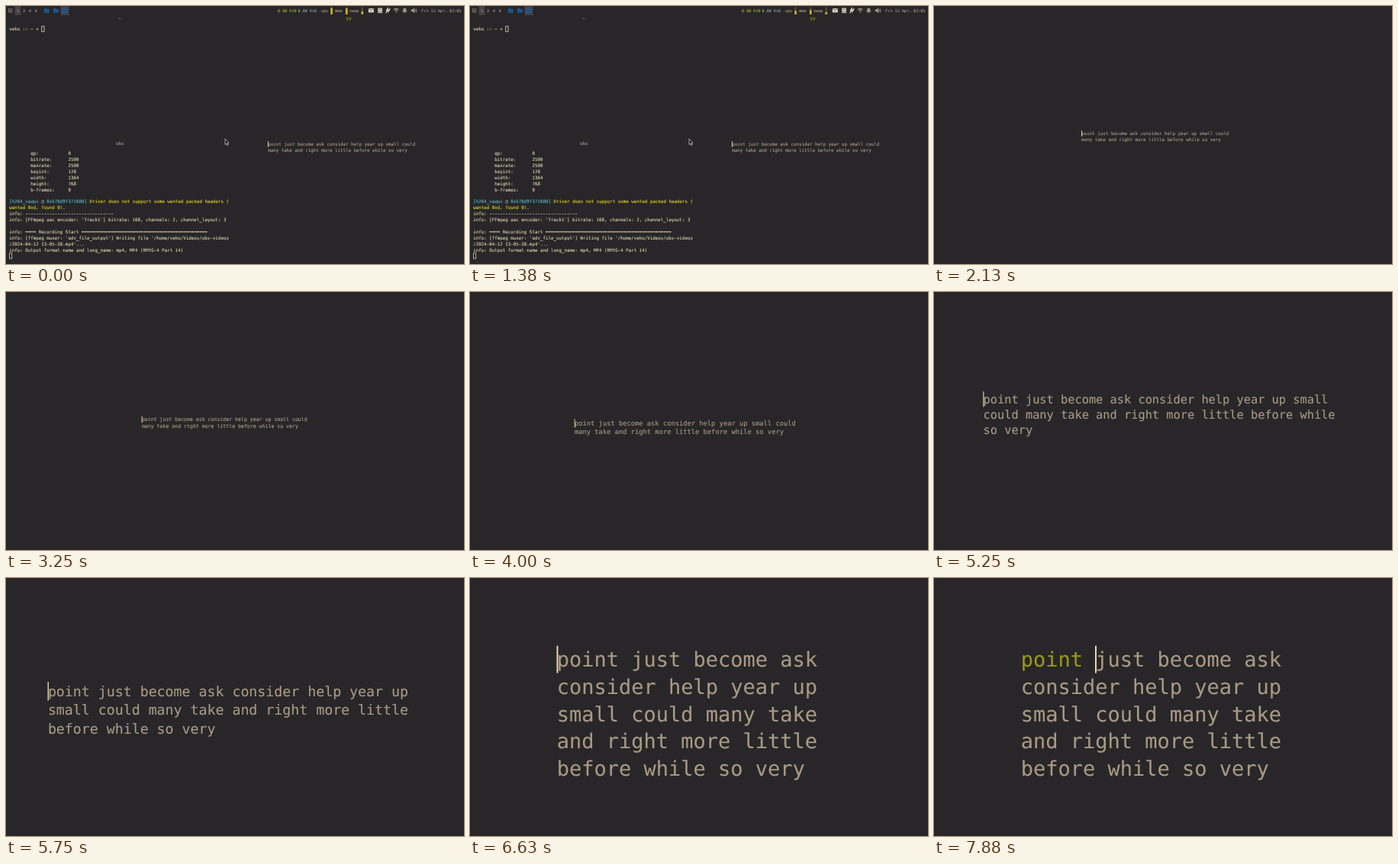
Write an HTML page that moves like this. It is 600 px wide and 338 px high and loops after 8 s.

```html
<!DOCTYPE html>
<html lang="en">
<head>
<meta charset="utf-8">
<title>Typing test</title>
<style>
  html, body { margin: 0; width: 100%; height: 100%; overflow: hidden; background: #282628; }
  svg { display: block; width: 600px; height: 338px; }
  text { font-family: "DejaVu Sans Mono", monospace; white-space: pre; text-rendering: geometricPrecision; }
</style>
</head>
<body>
<svg id="stage" viewBox="0 0 600 338">
  <g id="desk">
    <g id="bar"></g>
    <g id="panes"></g>
  </g>
  <g id="typer"></g>
  <path id="pointer" d="M287 173.8V181.6L288.8 180.1L290 182.7L291.1 182.1L290 179.7L292 179.3Z"
        fill="#1c1a1c" stroke="#d8d4cc" stroke-width=".7"/>
</svg>
<script>
const LOOP = 8000, SCREEN = 1366, K = 600 / SCREEN;
const EM = 0.602;                       // advance of one character, in em
const FG = '#ddd0aa', DIM = '#a89984', GREEN = '#98971a', YELLOW = '#dcd520', CYAN = '#5bb5bd';
const $ = id => document.getElementById(id);

function add(parent, tag, attrs, content) {
  const el = document.createElementNS('http://www.w3.org/2000/svg', tag);
  for (const k in attrs) el.setAttribute(k, attrs[k]);
  if (content !== undefined) el.textContent = content;
  return parent.appendChild(el);
}
const rect = (p, x, y, width, height, fill, more) => add(p, 'rect', { x, y, width, height, fill, ...more });
const path = (p, d, stroke, more) => add(p, 'path', { d, stroke, fill: 'none', 'stroke-width': 0.8, ...more });
const write = (p, x, y, s, adv, fill) =>
  add(p, 'text', { x, y, 'font-size': adv / EM, fill, stroke: fill, 'stroke-width': 0.12 }, s);

// Status bar
function drawBar() {
  const bar = $('bar'), adv = 7 * K, y = 7.9;
  for (let i = 0; i < 9; i++) rect(bar, 3 + i % 3 * 2, 3.4 + (i / 3 | 0) * 2, 1.2, 1.2, DIM);
  rect(bar, 11.5, 0, 8, 12, '#454145');
  [['1', 14], ['3', 22], ['4', 30], ['4', 37.8]].forEach(([s, x]) => write(bar, x, y, s, adv, DIM));
  rect(bar, 71.5, 0, 11, 12, '#454145');
  for (const x of [50.3, 62.6, 74.4])
    path(bar, `M${x} 3.4h2l.8 .9h2.8v4h-5.6z`, '#1f66ad', { fill: '#1b4f86' });
  write(bar, 356, y, '0.00 KiB', adv, '#a9a72c');
  write(bar, 382.6, y, '0.00 KiB', adv, '#83a598');
  [['cpu', 412.8], ['mem', 431], ['swap', 450]].forEach(([s, x]) => write(bar, x, y, s, adv, DIM));

  rect(bar, 474.8, 3.2, 7, 5.2, '#e4dcc4');
  path(bar, 'M475 3.6L478.3 6.2L481.6 3.6', '#282628', { 'stroke-width': 0.7 });
  rect(bar, 487.6, 3, 5, 5.8, '#8f8a82', { stroke: '#d8d0bc', 'stroke-width': 0.8 });
  rect(bar, 489, 4.5, 2.2, 2.6, '#e4dcc4');
  path(bar, 'M498 9.5L499 4.5L500.4 3L499.8 7M500 8.5L503 3.2L501.8 6.6', '#e4dcc4', { 'stroke-width': 1.2 });
  path(bar, 'M507.8 4.6Q511.2 1.6 514.6 4.6M509.2 6.2Q511.2 4.4 513.2 6.2M511.2 7.2V8.6', '#c8bfa8', { 'stroke-width': 1 });
  path(bar, 'M519.6 7.6H525L524.2 6.4V5Q524 3 522.3 3T520.4 5V6.4ZM521.6 9H523', '#a89984', { fill: '#a89984' });
  path(bar, 'M531.2 4.8H532.8L534.8 3V8.8L532.8 7H531.2Z', '#a89984', { fill: '#a89984' });
  path(bar, 'M536 4.4Q537 6 536 7.4M537.2 3.4Q538.8 6 537.2 8.6', '#a89984');
  write(bar, 544.3, y, 'Fri 12 Apr, 01:05', adv, DIM);
}

// Level meters: [x, level before, level after]
const METERS = [[425.2, 0.9, 0.5], [444.9, 0.85, 0.6], [465.4, 0.4, 0.3]].map(([x, ...levels]) => {
  rect($('desk'), x, 1.5, 2.6, 9.5, '#4c4742');
  return { el: rect($('desk'), x, 0, 2.6, 0, '#cfae2a'), levels };
});
function setMeters(i) {
  for (const { el, levels } of METERS) {
    el.setAttribute('y', 11 - 9.5 * levels[i]);
    el.setAttribute('height', 9.5 * levels[i]);
  }
}

// Terminal panes
const USER = 'veko';
const LOG = [
  ...Object.entries({ qp: 0, bitrate: 2500, maxrate: 2500, keyint: 120, width: 1364, height: 768, 'b-frames': 0 })
    .map(([k, v]) => ' '.repeat(8) + (k + ':').padEnd(14) + v),
  '',
  '[h264_vaapi @ 0x578d9f371600] Driver does not support some wanted packed headers (',
  'wanted 0xd, found 0).',
  'info: ' + '-'.repeat(33),
  "info: [FFmpeg aac encoder: 'Track1'] bitrate: 160, channels: 2, channel_layout: 3",
  '',
  'info: ==== Recording Start ' + '='.repeat(47),
  `info: [ffmpeg muxer: 'adv_file_output'] Writing file '/home/${USER}/Videos/obs-videos`,
  "/2024-04-12 13-05-38.mp4'...",
  'info: Output format name and long_name: mp4, MP4 (MPEG-4 Part 14)'
];
function drawPanes() {
  const p = $('panes'), adv = 8 * K, x = 4.2, step = 18 * K;
  const box = (bx, by) => rect(p, bx, by, 3.2, 7.2, 'none', { stroke: FG, 'stroke-width': 0.8 });
  write(p, 147.6, 18.2, '~', adv, DIM);
  write(p, 445.8, 18.4, 'py', adv, GREEN);
  write(p, 144, 181.8, 'obs', adv, DIM);
  write(p, x, 32.2, USER + ' :: ~ »', adv, FG);
  box(46.8, 26.5);
  LOG.forEach((line, i) => {
    const y = 195.1 + i * step;
    if (line[0] === '[') {
      const cut = line.indexOf(']') + 1;
      write(p, x, y, line.slice(0, cut), adv, CYAN);
      write(p, x + cut * adv, y, line.slice(cut), adv, YELLOW);
    } else write(p, x, y, line, adv, line.startsWith('wanted') ? YELLOW : FG);
  });
  box(x + 0.4, 323.7);
}

// Typing test
const WORDS = ('point just become ask consider help year up small could ' +
  'many take and right more little before while so very').split(' ');

function wrap(limit) {
  const lines = [];
  for (const w of WORDS) {
    const last = lines.length - 1;
    if (last >= 0 && lines[last].length + 1 + w.length <= limit) lines[last] += ' ' + w;
    else lines.push(w);
  }
  return lines;
}

// [time, cell width, cell height, left and top in stage px, longest line]
const ZOOM = [
  [0, 8, 18, 343.2, 177],
  [1750, 8, 18, 193.3, 163],
  [3250, 9, 20, 177.9, 162.6],
  [3500, 10, 22, 166.9, 159.4],
  [3750, 11, 24, 154.6, 163.6],
  [4000, 12, 26, 137, 166.3],
  [4250, 13, 28, 125.6, 159.6],
  [4380, 14, 31, 110.7, 162],
  [4750, 16, 35, 84.3, 162],
  [5130, 19, 42, 41.7, 156],
  [5250, 21, 46, 64.6, 130.4, 50],
  [5630, 23, 51, 40.4, 144, 50],
  [5750, 25, 56, 54.9, 136, 43],
  [6630, 37, 81.3, 113.8, 88.8, 21]
];
// [time, characters typed]
const KEYS = [[0, 0], [7500, 1], [7630, 3], [7750, 5], [7880, 6]];
const at = (table, t) => table.filter(row => row[0] <= t).pop();

function drawTyper([, w, h, left, top, limit = 59], typed) {
  const g = $('typer'), adv = w * K, step = h * K;
  g.replaceChildren();
  wrap(limit).forEach((line, i) => {
    const y = top + step * (i + 0.765), n = i ? 0 : typed;
    if (n) write(g, left, y, line.slice(0, n), adv, GREEN);
    write(g, left + n * adv, y, line.slice(n), adv, DIM);
  });
  rect(g, left + typed * adv - 0.3, top, Math.max(0.9, adv * 0.12), step, '#ebdbb2');
}

let shown = '';
function frame() {
  const t = performance.now() % LOOP;
  const zoom = at(ZOOM, t), typed = at(KEYS, t)[1], level = t < 630 ? 0 : 1;
  const key = [zoom[0], typed, level].join();
  if (key !== shown) {
    shown = key;
    const desk = t < ZOOM[1][0] ? 'inline' : 'none';
    $('desk').style.display = $('pointer').style.display = desk;
    setMeters(level);
    drawTyper(zoom, typed);
  }
  requestAnimationFrame(frame);
}

drawBar();
drawPanes();
frame();
</script>
</body>
</html>
```
